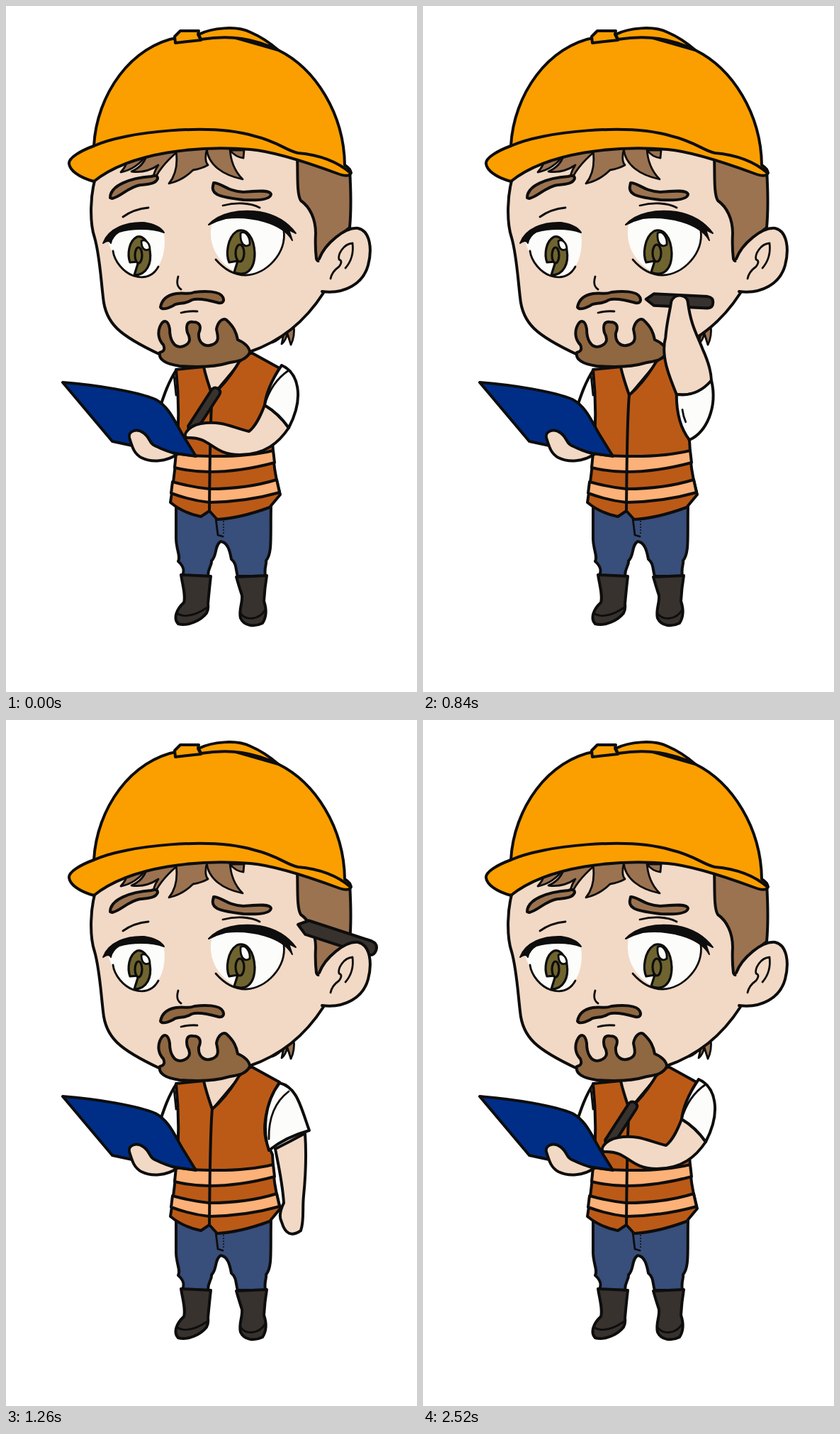
An HTML page for the animation above (2.58 s loop, 580x966 px).

```html
<!DOCTYPE html>
<html lang="en">
<head>
<meta charset="utf-8">
<title>Site worker</title>
<style>
  html, body { margin: 0; width: 100%; height: 100%; overflow: hidden; background: #fff; }
  svg { display: block; width: 100%; height: 100%; }
  path, ellipse { stroke: #0d0d0d; stroke-width: 4; stroke-linecap: round; stroke-linejoin: round; fill: none; }
  .pen { vector-effect: non-scaling-stroke; }
  .skin { fill: #f2d9c5; }
  .hair { fill: #9b7351; }
  .beard { fill: #8f6741; }
  .helmet { fill: #fb9f00; }
  .vest { fill: #bb5a17; }
  .band { fill: #fcb178; }
  .white { fill: #fcfcfa; }
  .jeans { fill: #384e7b; }
  .dark { fill: #37322e; }
  .board { fill: #002e87; }
  .iris { fill: #6f642f; stroke-width: 3.2; }
  .ink { fill: #0d0d0d; stroke-width: 2; }
  .bare { stroke: none; }
  .thin { stroke-width: 2.8; }
  .dots { stroke-width: 2; stroke-dasharray: 0 4; }
</style>
</head>
<body>
<svg viewBox="0 0 580 966">
  <g id="body">
    <path class="hair thin" d="M376 474 Q386 470 392 461 L389 476 Q395 471 397 461 L402 477 Q408 466 406 448 L380 460Z"/>
    <path class="jeans" d="M240 703 V750 C240 765 247 775 243 782 C251 789 252 795 249 802 L285 803 C285 790 291 788 290 781 C298 775 294 759 303 754 C313 755 316 768 318 779 C326 785 324 795 327 803 H366 C364 790 368 787 367 781 C376 770 373 750 374 703Z"/>
    <path class="thin" d="M296 721 L299 745 L306 747"/>
    <path class="dots" d="M307 726 V746"/>
    <path class="dark" d="M247 801 L289 803 Q287 820 285 842 Q286 850 283 855 C275 865 257 874 243 870 C236 863 240 850 251 840 C254 830 249 815 247 801Z"/>
    <path class="dark" d="M325 804 L368 802 Q365 820 364 838 C368 850 368 860 362 869 C350 875 336 873 331 862 C328 850 334 842 333 830 Q329 818 325 804Z"/>
    <path class="thin" d="M241 855 C255 864 272 855 284 847 M331 855 C338 866 357 865 366 850"/>
    <path class="white" d="M240 513 C229 530 223 548 217 566 L246 598 L244 514Z"/>
    <path class="thin" d="M237 519 L240 548"/>
    <path class="skin" d="M276 506 L291 549 L334 498Z"/>
    <path class="vest" d="M240 512 L279 508 Q282 522 291 548 Q312 530 329 501 L346 488 L386 510 C370 535 361 568 367 592 L376 612 L377 628 C378 660 384 674 387 688 L372 706 C350 714 320 722 298 723 L287 711 L275 719 Q250 714 232 699 C235 680 240 640 241 625 Q246 570 240 512Z"/>
    <path class="band" d="M240 630 Q265 634 287 634 Q340 635 377 626 L379 643 Q330 656 287 656 Q262 656 238 650Z"/>
    <path class="band" d="M235 670 Q260 677 287 680 Q340 680 382 667 L386 685 Q340 698 287 699 Q260 696 233 686Z"/>
    <path d="M291 548 Q288 580 287 711"/>
    <path class="board" d="M80 530 C130 534 185 543 211 554 C230 564 238 585 250 605 L268 634 L206 625 L150 613Z"/>
    <path class="skin" d="M174 608 C172 599 184 594 194 601 C204 608 202 617 212 620 Q226 627 242 631 C226 642 205 643 191 636 C180 630 178 620 174 608Z"/>
  </g>

  <g id="head">
    <path class="skin bare" d="M128 236 C118 265 118 305 125 326 C132 350 134 385 137 410 C140 447 160 464 218 491 L344 487 C385 473 421 446 448 404 L456 380 L452 345 L420 200 L290 190 L140 220Z"/>
    <path d="M128 236 C118 265 118 305 125 326 C132 350 134 385 137 410 C140 447 160 464 218 491 M344 487 C385 473 421 446 448 404"/>
    <path class="hair" d="M411 212 C412 235 410 265 416 274 C429 283 437 300 437 320 Q436 340 438 356 Q441 363 444 354 C450 335 470 324 485 312 Q488 280 485 230Z"/>
    <path id="earPen" class="pen dark"/>
    <path class="skin" d="M442 356 C450 335 478 311 497 313 C514 317 517 342 511 365 C504 391 478 406 446 402"/>
    <path class="thin" d="M489 334 C476 335 468 350 470 357 Q476 359 470 367 Q460 374 458 384 M489 334 C491 350 486 361 479 369"/>

    <path class="hair thin" d="M164 217 Q176 218 162 234 Q184 230 199 209Z"/>
    <path class="hair thin" d="M199 209 Q194 226 177 233 Q197 236 215 224 Q206 237 208 249 Q215 228 242 205Z"/>
    <path class="hair thin" d="M240 204 Q244 233 230 250 Q250 245 264 231 Q276 229 285 224 Q279 217 284 200Z"/>
    <path class="hair thin" d="M283 200 C285 224 306 238 334 244 Q317 227 316 200Z"/>
    <path class="hair thin" d="M316 203 Q324 213 335 214 L336 203Z"/>
    <path class="hair" d="M147 270 C147 253 175 242 205 240 Q214 237 214 243 C211 251 200 251 190 252 C172 255 163 268 150 271Z"/>
    <path class="hair" d="M293 249 C304 249 312 261 335 262 C350 261 372 258 374 265 C373 273 354 274 335 273 C312 270 289 268 292 254Z"/>
    <path class="thin" d="M165 297 Q180 286 201 284 M306 281 C325 276 345 277 358 284"/>

    <path class="white bare" d="M143 326 C160 305 212 307 222 317 C228 340 220 380 190 382 C165 379 148 350 143 326Z"/>
    <path class="iris" d="M185 325 C173 331 171 350 175 361 L187 360 L181 379 C199 379 206 362 203 344 C200 330 192 323 185 325Z"/>
    <path class="white thin" d="M191 331 C197 327 203 335 203 342 C196 346 191 342 191 331Z"/>
    <ellipse class="iris" cx="187" cy="351" rx="5" ry="11"/>
    <path class="ink" d="M137 334 C145 313 170 304 195 305 Q216 308 223 319 C205 312 176 313 160 318 Q150 324 148 334 Q145 328 137 334Z"/>
    <path class="thin" d="M151 345 C153 360 166 375 180 380 Q204 387 215 367"/>

    <path class="white bare" d="M290 308 C310 292 370 292 393 312 C395 345 372 378 338 379 C310 373 283 345 290 308Z"/>
    <path class="iris" d="M326 317 C312 326 310 350 315 361 L327 359 L322 375 C337 381 351 374 351 348 C350 326 340 312 326 317Z"/>
    <path class="white thin" d="M331 320 C338 315 345 326 344 336 C337 341 330 335 331 320Z"/>
    <ellipse class="iris" cx="330" cy="348" rx="6" ry="12"/>
    <path class="ink" d="M286 308 C301 291 330 286 358 290 C386 295 400 308 409 320 L399 315 L404 330 C390 305 345 295 310 299 Q298 302 286 308Z"/>
    <path class="thin" d="M296 357 Q315 379 338 379 C368 378 396 348 392 316"/>

    <path class="thin" d="M243 381 Q239 394 247 399 M247 432 Q258 429 270 430"/>
    <path class="beard" d="M218 424 C220 413 228 407 240 405 C253 403 256 407 266 403 C280 401 302 401 306 410 C309 416 305 419 300 418 C282 413 270 411 262 414 C251 421 242 417 236 422 C226 427 220 428 218 424Z"/>
    <path class="beard" d="M217 452 C222 440 229 442 231 455 C231 470 237 480 246 480 C259 478 262 470 256 460 C253 448 257 444 264 445 C274 445 276 452 272 461 C271 474 280 481 291 477 C303 473 298 462 297 455 C299 444 306 439 311 442 C322 452 325 460 327 470 C337 474 344 481 344 488 C338 500 325 500 312 503 C290 510 260 508 245 507 C225 504 215 498 217 488 Q226 486 222 477 C215 470 214 460 217 452Z"/>

    <path class="helmet" d="M124 197 C128 125 176 55 245 44 L300 38 L384 62 C437 88 477 152 478 224 Q486 229 487 235 Q484 242 468 236 C430 222 380 205 345 202 C275 196 176 205 124 247 C102 241 90 231 89 222 C88 214 105 204 124 197Z"/>
    <path d="M124 197 C170 176 290 165 350 183 C384 191 396 204 412 207 Q458 211 486 235"/>
    <path class="helmet" d="M272 40 C290 31 325 27 345 37 Q366 46 384 62 C350 46 318 40 275 47Z"/>
    <path class="helmet" d="M239 52 L238 43 L246 35 L272 35 L271 40 L275 48Z"/>
  </g>

  <path id="handPen" class="pen dark"/>
  <path id="fore" class="skin"/>
  <path id="sleeve" class="white"/>
  <path id="crease" class="thin"/>
</svg>
<script>
const STEP = 60, STEPS = 43;
const $ = id => document.getElementById(id);
const PEN = "M0 0 L13 -10 H106 Q116 -9 116 0 Q116 10 106 10 H14Z";
for (const id of ["earPen", "handPen"]) $(id).setAttribute("d", PEN);

// Arm outlines. Poses that blend into each other share one command order.
const writeSleeve = "M389 506 C412 516 422 550 399 594 Q385 574 365 562 C367 545 376 525 389 506";
const poses = {
  write: {
    sleeve: writeSleeve,
    crease: "M399 513 Q374 530 365 562",
    fore: "M365 562 C358 580 352 592 343 599 C320 594 305 583 275 588 C255 592 248 607 256 608 C290 606 290 632 330 632 C365 632 385 615 399 594 Q385 574 365 562"
  },
  lift: {
    sleeve: writeSleeve,
    crease: "M399 513 Q374 530 365 562",
    fore: "M365 562 C356 575 345 578 338 575 C315 565 300 550 280 545 C262 545 258 558 266 567 C290 575 300 610 335 622 C365 630 388 615 399 594 Q385 574 365 562"
  },
  waist: {
    sleeve: "M386 511 C410 518 421 545 421 587 Q397 575 371 579 C364 565 368 535 386 511",
    crease: "M399 523 Q372 545 371 580",
    fore: "M371 579 C371 592 375 602 379 614 C370 612 360 611 350 611 C334 613 332 627 344 631 C360 640 375 641 392 641 C408 632 417 610 418 587 Q397 575 371 579"
  },
  down: {
    sleeve: "M386 511 C411 517 416 545 428 578 Q395 587 371 606 C362 580 364 540 386 511",
    crease: "M399 523 Q370 545 371 590",
    fore: "M380 604 C384 625 390 650 392 680 C388 688 384 698 389 707 C394 724 403 728 416 719 C421 705 418 690 420 670 C423 640 424 610 422 582 Q400 594 380 604"
  },
  chest: {
    sleeve: "M376 612 C402 605 416 570 408 535 Q385 560 356 556 C356 580 362 600 376 612",
    crease: "M366 575 Q368 585 371 592",
    fore: "M356 556 C340 535 322 510 322 490 C318 470 318 458 320 448 C325 436 343 438 344 450 C350 480 372 490 388 505 C400 515 406 525 408 535 Q385 560 356 556"
  },
  face: {
    sleeve: "M376 609 C396 590 416 555 405 512 Q388 534 361 528 C361 560 366 585 376 609",
    crease: "M366 555 Q366 565 370 573",
    fore: "M361 528 C360 490 362 455 383 420 C395 398 410 370 411 352 C417 338 435 341 434 356 C434 385 412 400 408 440 C407 470 408 490 405 514 Q388 534 361 528"
  },
  ear: {
    sleeve: "M376 610 C390 590 412 560 417 522 Q392 538 375 497 C368 530 362 575 376 610",
    crease: "M374 535 Q375 560 379 573",
    fore: "M375 497 C382 470 388 430 408 402 C425 375 445 340 455 324 C463 314 475 314 474 324 C470 370 460 395 448 418 C432 450 424 480 416 524 Q392 538 375 497"
  }
};

// Pen: tip x, tip y, angle, scale
const pens = {
  write: [258, 602, -57, .65],
  lift: [262, 562, -38, .7],
  chest: [287, 447, -4, .8],
  face: [370, 345, 16.5, .85],
  ear: [412, 288, 18, 1]
};
const raised = ["chest", "face", "ear"];
const keys = [[0, "write"], [9, "write"], [12, "lift"], [13, "chest"], [16, "face"], [18, "ear"],
  [19, "chest"], [20, "waist"], [21, "down"], [34, "down"], [35, "waist"], [36, "chest"],
  [38, "ear"], [40, "face"], [41, "chest"], [42, "write"]];

const mix = (a, b, k) => a + (b - a) * k;
function mixPath(a, b, k) {
  const to = b.match(/[\d.]+/g);
  let i = 0;
  return a.replace(/[\d.]+/g, n => mix(+n, +to[i++], k).toFixed(1));
}
function place(pen, [x, y, angle, scale]) {
  pen.setAttribute("transform", `translate(${x} ${y}) rotate(${angle}) scale(${scale})`);
}
place($("earPen"), pens.ear);

function draw(step) {
  let i = keys.length - 1;
  while (keys[i][0] > step) i--;
  const [start, from] = keys[i];
  const [end, to] = keys[i + 1] || keys[i];
  const k = end > start ? (step - start) / (end - start) : 0;
  const blend = raised.includes(from) === raised.includes(to) ? k : 0;
  for (const part of ["sleeve", "crease", "fore"])
    $(part).setAttribute("d", mixPath(poses[from][part], poses[to][part], blend));

  const stowed = step >= 18 && step <= 38;
  $("earPen").style.display = stowed ? "" : "none";
  $("handPen").style.display = stowed ? "none" : "";
  if (!stowed) {
    const pen = pens[from].map((v, n) => mix(v, pens[to][n], blend));
    if (step < 10) pen[2] -= 2 * (3 - Math.abs(3 - step % 6));
    place($("handPen"), pen);
  }
}

function tick() {
  draw(Math.floor(performance.now() / STEP) % STEPS);
  requestAnimationFrame(tick);
}
tick();
</script>
</body>
</html>
```
